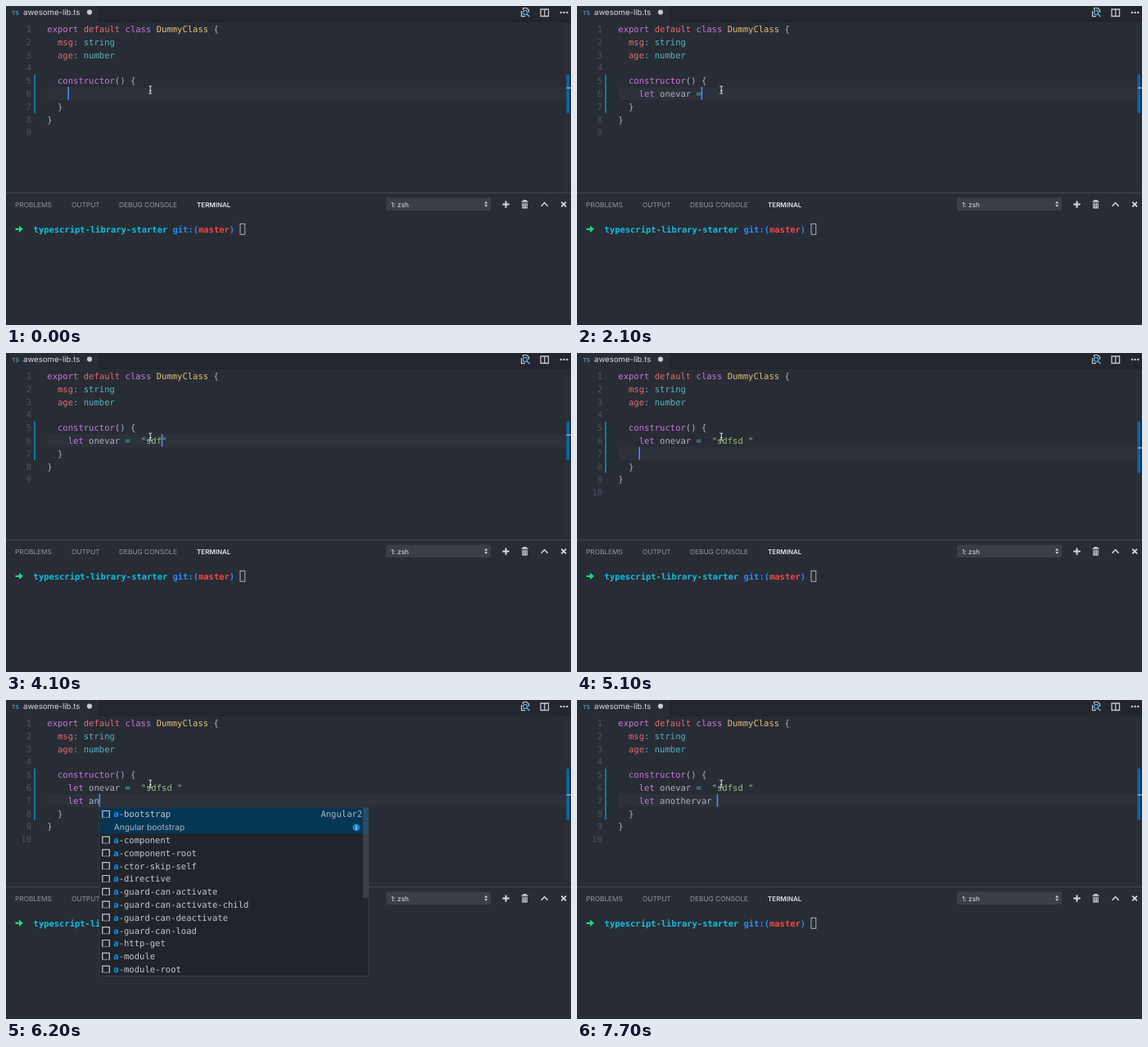
These frames come from a looping animation (690x390 px, 8 s). An HTML page:

```html
<!DOCTYPE html>
<html lang="en">
<head>
<meta charset="utf-8">
<title>Editor typing</title>
<style>
  html, body { margin: 0; width: 100%; height: 100%; overflow: hidden; background: #282c34; }
  svg { display: block; width: 690px; height: 390px; }
  text { white-space: pre; text-rendering: geometricPrecision; }
  .mono { font: 10.55px "DejaVu Sans Mono", monospace; fill: #abb2bf; }
  .term { font: bold 10.46px "DejaVu Sans Mono", monospace; }
  .ui { font: 8.3px Inter, "Open Sans", sans-serif; fill: #9096a1; }
  .num { fill: #4b5263; text-anchor: end; }
  .hit { fill: #0097fb; font-weight: bold; }
  .item { fill: #c3c7ce; }
</style>
</head>
<body>
<svg viewBox="0 0 690 390" xmlns="http://www.w3.org/2000/svg">
  <rect width="690" height="390" fill="#282c34"/>
  <rect x="113" width="577" height="20" fill="#23262d"/>

  <!-- tab -->
  <text class="ui" x="7" y="10.6" style="font-size:7px;font-weight:600;fill:#519aba">TS</text>
  <text class="ui" x="21" y="11" style="font-size:9.6px;fill:#d7dae0">awesome-lib.ts</text>
  <circle cx="102" cy="7.6" r="3.1" fill="#c5c8ce"/>

  <!-- editor actions -->
  <g fill="none" stroke="#c5c8ce" stroke-width="1.2">
    <path d="M631.5 5V2.5H636L638.5 5V8M629.5 6V12.6H634"/>
    <circle cx="634" cy="8" r="2.6" stroke="#5ba8e0"/>
    <path d="M636 10L639.5 13.2" stroke="#5ba8e0" stroke-width="1.6"/>
    <path d="M653 4H662.5V12.5H653ZM657.8 4V12.5M652.4 4.2H663" stroke-width="1.3"/>
  </g>
  <g fill="#c5c8ce">
    <circle cx="677.8" cy="8" r="1.3"/><circle cx="681.5" cy="8" r="1.3"/><circle cx="685.2" cy="8" r="1.3"/>
  </g>

  <g id="code"></g>

  <!-- pointer -->
  <path d="M174.3 97.8Q176.3 97.8 176.3 99Q176.3 97.8 178.3 97.8M176.3 98.6V106.4M174.3 107.2Q176.3 107.2 176.3 106Q176.3 107.2 178.3 107.2M175 103.6H177.6" fill="none" stroke="#e6e6e6" stroke-width="1"/>

  <!-- panel -->
  <rect y="228" width="690" height="1" fill="#42464f"/>
  <g class="ui">
    <text x="11" y="245.9">PROBLEMS</text>
    <text x="80" y="245.9">OUTPUT</text>
    <text x="138" y="245.9">DEBUG CONSOLE</text>
    <text x="233" y="245.9" style="font-weight:600;font-size:8px;fill:#e4e6ea">TERMINAL</text>
  </g>
  <rect x="464" y="234.5" width="128" height="15.5" rx="1.5" fill="#3a3e47"/>
  <text class="ui" x="470" y="245.5" style="fill:#e4e6ea">1: zsh</text>
  <path d="M584.2 241.4L586.2 238.8L588.2 241.4ZM584.2 243.2L586.2 245.8L588.2 243.2Z" fill="#d7dae0"/>
  <g fill="none" stroke="#d7dae0">
    <path d="M606.3 242.6H614.7M610.5 238.4V246.8" stroke-width="2"/>
    <path d="M629.5 239.2H637.5M632 238.6V237.6H635V238.6" stroke-width="1.2"/>
    <path d="M630.8 240.8V247H636.2V240.8M632.6 240.8V246.5M634.4 240.8V246.5" stroke-width="1.1"/>
    <path d="M653.6 244.8L657.6 240.6L661.6 244.8" stroke-width="1.5"/>
    <path d="M678.2 239.6L684 245.4M684 239.6L678.2 245.4" stroke-width="1.8"/>
  </g>
  <path d="M11.5 271.7H16V268.6L20.8 272.8L16 277V273.9H11.5Z" fill="#1ed98a"/>
  <text class="term" x="33.6" y="276.6"><tspan fill="#11bfe0">typescript-library-starter</tspan><tspan fill="#2b8af5"> git:(</tspan><tspan fill="#f54545">master</tspan><tspan fill="#2b8af5">)</tspan></text>
  <rect x="286" y="266.3" width="5.8" height="13" fill="none" stroke="#abb2bf"/>

  <g id="popup"></g>
</svg>
<script>
const LOOP = 8000, LEFT = 50.3, CHAR = 6.351, TOP = 20.2, ROW = 15.8;
const PURPLE = '#c678dd', RED = '#e06c75', CYAN = '#56b6c2', GOLD = '#e5c07b', GREEN = '#98c379', GREY = '#abb2bf';
const codeLayer = document.getElementById('code');
const popupLayer = document.getElementById('popup');

// Each run types one key every 100 ms; < and > move the caret.
const keys = [
  [500, 'let on'], [1200, 'e'], [1700, 'var ='], [2300, ' '], [2500, ' '], [2700, '"'],
  [3100, '>'], [3800, '<'], [4000, 'sd'], [4100, 'f'], [4300, 'sd '], [4800, '>'], [5100, '\n'],
  [5600, 'le'], [5900, 't '], [6100, 'an'], [6300, 'oth'], [6700, 'erv'], [7100, 'ar'], [7400, ' ']
].flatMap(([t, run]) => [...run].map((key, i) => ({ t: t + i * 100, key })));

function typedAt(time) {
  const lines = [''];
  let caret = 0;
  for (const { t, key } of keys) {
    if (t > time) continue;
    const last = lines.length - 1, line = lines[last];
    if (key === '<') caret--;
    else if (key === '>') caret++;
    else if (key === '\n') { lines.push(''); caret = 0; }
    else {
      const added = key === '"' ? '""' : key;
      lines[last] = line.slice(0, caret) + added + line.slice(caret);
      caret++;
    }
  }
  return { lines, caret };
}

const span = (s, fill) => `<tspan fill="${fill}">${s}</tspan>`;
const rect = (x, y, w, h, fill) => `<rect x="${x}" y="${y}" width="${w}" height="${h}" fill="${fill}"/>`;
const label = (x, y, s, cls = 'mono') => `<text class="${cls}" x="${x}" y="${y}">${s}</text>`;
const field = (name, type) => '  ' + span(name, RED) + span(': ' + type, CYAN);

const paint = line => '    ' + line.replace(/\blet\b|"[^"]*"|=/g, s =>
  span(s, s === 'let' ? PURPLE : s === '=' ? CYAN : GREEN));

function drawCode({ lines, caret }) {
  const rows = [
    span('export ', PURPLE) + span('default ', RED) + span('class ', PURPLE) + span('DummyClass', GOLD) + ' {',
    field('msg', 'string'), field('age', 'number'), '',
    '  ' + span('constructor', PURPLE) + '() {',
    ...lines.map(paint), '  }', '}', ''
  ];
  const active = 4 + lines.length;
  const y = TOP + active * ROW, barH = (2 + lines.length) * ROW - .4;
  let out = rect(LEFT, y, 634, ROW, '#2c313a');
  out += rect(34, 83.8, 2, barH, '#0c7d9d');
  out += rect(684, 20, .8, 208, '#31353e') + rect(684.4, 83.8, 3.6, barH, '#0766ad');
  out += rect(684.4, 99.4 + (active - 5) * ROW, 5.6, 1.6, '#9a9fa8');
  rows.forEach((row, i) => {
    const base = 32 + i * ROW;
    out += label(31, base, i + 1, 'mono num') + label(LEFT, base, row);
  });
  codeLayer.innerHTML = out + rect(LEFT + (caret + 4) * CHAR - .3, y - .2, 1.6, ROW - .2, '#528bff');
}

const icons = {
  field: '<path d="M2.5 -3.5H.5V3.5H2.5M8.5 -3.5H10.5V3.5H8.5" fill="none" stroke="#c5c8ce"/><path d="M3.2 0L5.6 -2L8 -.6L5.4 1.8Z" fill="#75beff"/>',
  word: '<path d="M0 -3.5H6M7.5 -3.5H10.5M0 -1H3M4.5 -1H10.5M0 1.5H7M0 4H4M5.5 4H10.5" fill="none" stroke="#c5c8ce" stroke-width="1.2"/>',
  type: '<path d="M.5 -1L4 -4.2L6 -2.2L2.5 1.2ZM6.5 .2L8.5 -1.4L10.5 .4L8.5 2ZM5 3L7 1.6L9.6 3.4L7.8 5Z" fill="#e8ab53"/><path d="M4 0L6 2.8" stroke="#e8ab53"/>',
  iface: '<circle cx="2.3" cy="0" r="1.6" fill="none" stroke="#75beff" stroke-width="1.1"/><path d="M4 0H6" stroke="#75beff" stroke-width="1.2"/><circle cx="8.3" cy="0" r="2.3" fill="#75beff"/>',
  snippet: '<path d="M1 4V-4H9.5V4" fill="none" stroke="#c5c8ce" stroke-width="1.2"/><path d="M1 4H9.5" stroke="#c5c8ce" stroke-width="1.2" stroke-dasharray="1.2 1.2"/>'
};
const icon = (x, y, kind) => `<g transform="translate(${x} ${y})">${icons[kind]}</g>`;
const mark = s => s.replace(/\[(.*?)\]/g, '<tspan class="hit">$1</tspan>');

const frame = (x, w, h) =>
  `<rect x="${x}" y="131.3" width="${w}" height="${h}" fill="#21252b" stroke="#3b4048" stroke-width=".8"/>`;

function wordPopup() {
  const items = ['[le]ngth', '[le]t', 'G[Le]num', 'ANG[LE]_instanced_arrays', 'HTM[LE]lement',
    'HTM[LE]lementEventMap', 'HTM[LE]lementTagNameMap', 'HTM[LE]mbedElement', 'HTML[Le]gendElement',
    'screen[Le]ft', 'SVGAnimated[Le]ngth', 'SVGAnimated[Le]ngthList'];
  const kinds = { 0: 'field', 1: 'word', 2: 'type', 9: 'field' };
  let out = frame(90.2, 329.6, 190.6) + rect(90.6, 131.7, 328.8, 15.6, '#073655');
  out += rect(412.5, 131.7, 7, 15.6, '#2d506b');
  items.forEach((s, i) => {
    const y = 139.5 + i * ROW;
    out += icon(93.5, y, kinds[i] || 'iface') + label(108, y + 3.9, mark(s), 'mono item');
  });
  return out + label(298.6, 143.4, 'var length: number', 'mono');
}

function snippetPopup() {
  const items = ['bootstrap', 'component', 'component-root', 'ctor-skip-self', 'directive', 'guard-can-activate',
    'guard-can-activate-child', 'guard-can-deactivate', 'guard-can-load', 'http-get', 'module', 'module-root'];
  let out = frame(114, 328.8, 206) + rect(114.4, 131.7, 328, 31.6, '#073655');
  items.forEach((s, i) => {
    const y = 139.5 + (i ? i + 1 : 0) * ROW;
    out += icon(116.8, y, 'snippet') + label(131.3, y + 3.9, mark('[a]-' + s), 'mono item');
  });
  out += label(384.4, 143.4, 'Angular2');
  out += '<text class="ui" x="131.8" y="158.6" style="font-size:10.2px;fill:#abb2bf">Angular bootstrap</text>';
  out += '<circle cx="427.8" cy="155.8" r="4.4" fill="#1b80c4"/><path d="M427.8 153V154.2M427.8 155.2V158.6" stroke="#d5e9f7" stroke-width="1.2"/>';
  return out + '<rect x="436" y="131.7" width="6.6" height="110.5" fill="#79818f" fill-opacity=".3"/>';
}

const popupAt = t =>
  t >= 5800 && t < 6000 ? wordPopup : t >= 6200 && t < 6500 ? snippetPopup : null;

let shown = '';
function render(t) {
  const state = typedAt(t), popup = popupAt(t);
  const id = state.lines.join('\n') + state.caret + (popup ? popup.name : '');
  if (id === shown) return;
  shown = id;
  drawCode(state);
  popupLayer.innerHTML = popup ? popup() : '';
}

const start = performance.now();
function tick() {
  render((performance.now() - start) % LOOP);
  requestAnimationFrame(tick);
}
tick();
</script>
</body>
</html>
```
